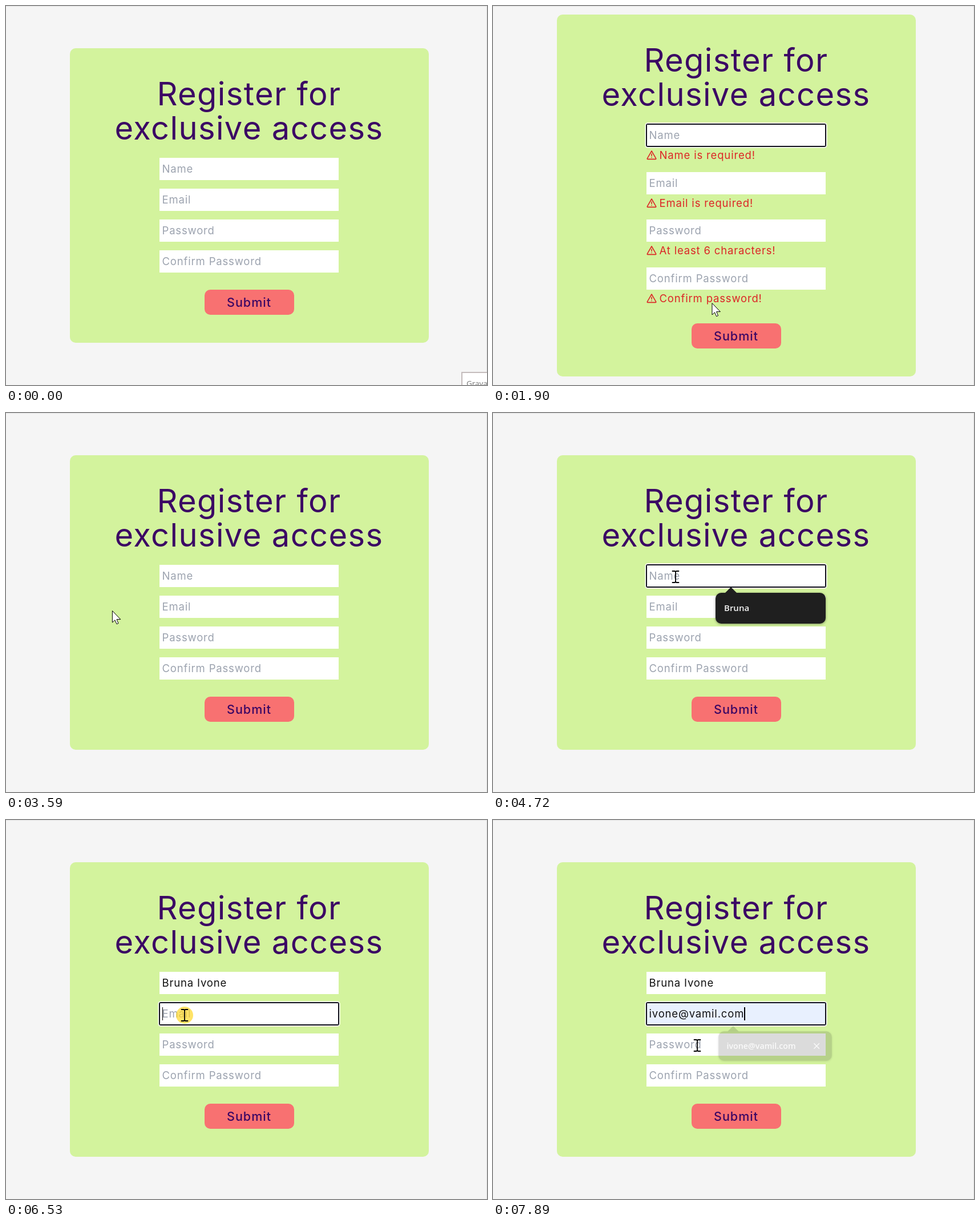
Animation of 843 by 664 pixels, one loop 7.99 s. Source, as an HTML page:

```html
<!DOCTYPE html>
<html lang="en">
<head>
<meta charset="utf-8">
<title>Register form</title>
<style>
html, body { margin: 0; width: 100%; height: 100%; overflow: hidden; background: #f5f5f5; }
body { position: relative; font: 18.5px Inter, sans-serif; font-optical-sizing: none; letter-spacing: .83px; }
body * { position: absolute; box-sizing: border-box; white-space: pre; }
#edge { inset: 0; border: solid #e2e2e2; border-width: 1px 1px 0 0; }
#tip { left: 798px; top: 641px; width: 90px; height: 40px; padding-left: 7px; border: 2px solid #c4bcbc; background: #fff;
  font: 13.5px/36px "Open Sans", sans-serif; letter-spacing: 0; color: #777; }
#card { left: 111.5px; width: 629px; border-radius: 10px; background: #d3f39d; }
h1 { margin: 0; top: 49.5px; width: 100%; text-align: center; font-size: 56px; font-weight: 400; line-height: 60px;
  letter-spacing: 1.4px; color: #3b0764; }
.field { left: 157.5px; width: 314px; height: 39px; }
.box { inset: 0; padding-left: 4.5px; line-height: 39px; background: #fff; color: #111; }
.box.empty { color: #9ca3af; }
.box.focus { border-radius: 2px; box-shadow: inset 0 0 0 1px #10101a, 0 0 0 1px #10101a, 0 0 0 2.5px #fff; }
.box.filled { background: #e8f0fe; }
.box i { position: static; display: inline-block; vertical-align: middle; width: 1.5px; height: 23px;
  margin: -2px -1.5px 0 0; background: #000; }
.error { left: 0; top: 36px; line-height: 36px; padding-left: 22.5px; color: #dc2626; }
.error svg { left: 0; top: 9px; }
#submit { left: 236px; width: 157px; height: 44px; border-radius: 10px; background: #f87171; color: #3b0764;
  text-align: center; font-size: 21.5px; font-weight: 500; line-height: 44px; letter-spacing: 1px; }
#menu { --bg: #1f1f1f; left: 390px; padding-top: 8px; background: var(--bg); color: #f2f2f2;
  font: 600 15px/37.6px "Open Sans", sans-serif; letter-spacing: 0; }
#menu::before { content: ""; position: absolute; left: 17px; top: -20px; border: 10px solid transparent;
  border-bottom-color: var(--bg); }
#menu span { position: static; display: block; padding-left: 15px; }
#menu svg { left: 175px; top: 21px; }
#over { left: 0; top: 0; }
</style>
</head>
<body>
<div id="edge"></div>
<div id="card">
  <h1>Register for
exclusive access</h1>
  <div id="submit">Submit</div>
</div>
<div id="tip">Gravando</div>
<div id="menu"></div>
<svg id="over" width="843" height="664">
  <circle id="halo" r="15" fill="#ffd51f" fill-opacity=".68"/>
  <g id="cursor" stroke-linejoin="round" stroke-linecap="round">
    <path id="arrow" fill="#fff" stroke="#000" d="M0 0V20L4.6 15.8L7.6 22.8L10.6 21.5L7.6 14.6H14Z"/>
    <g id="hand" fill="#fff" stroke="#000" stroke-width="1.2">
      <path d="M-2 1.5Q0-1.5 2 1.5V10Q4 8 5.5 10.5Q8 9 9 11.5Q12 10.5 12.5 13.5V18Q12 21 10 24.5H1L-6.5 15.5Q-6 12.5-3.5 13.5L-2 15Z"/>
      <path d="M2 10V14M5.5 11V14.5M9 12V15"/>
    </g>
    <path id="beam" fill="none" stroke="#000" stroke-width="1.8"
      d="M-5.5-10H-2Q0-10 0-8Q0-10 2-10H5.5M0-8V8M-5.5 10H-2Q0 10 0 8Q0 10 2 10H5.5"/>
  </g>
</svg>
<script>
const LOOP = 7990, STEP = 112.7;
const $ = id => document.getElementById(id);
const show = (el, on) => el.style.display = on ? '' : 'none';
const within = (t, ...spans) => spans.some(([a, b]) => t >= a && t < b);

const NAME = 'Bruna Ivone', EMAIL = 'ivone@vamil.com', OTHER = 'bruna@livia.eco.br';
const EMAILS = [OTHER, EMAIL, 'bruna.ivone@livia.eco.br', 'contato@livia.eco.br',
  'ivone@livia.eco.br', 'bruna@vamil.com', 'cadastro@livia.eco.br'];
const CROSS = '<svg width="12" height="12" stroke="currentColor" stroke-width="1.4"><path d="M1 1L11 11M11 1L1 11"/></svg>';
const WARN = `<svg width="18" height="18" fill="none" stroke="currentColor" stroke-width="1.6" stroke-linejoin="round"
  stroke-linecap="round"><path d="M9 2L16.6 15.2Q17 16.4 15.8 16.4H2.2Q1 16.4 1.4 15.2ZM9 7V10.6M9 13.3V13.4"/></svg>`;

const fields = [
  ['Name', 'Name is required!'],
  ['Email', 'Email is required!'],
  ['Password', 'At least 6 characters!'],
  ['Confirm Password', 'Confirm password!']
].map(([hint, message]) => {
  const root = document.createElement('div');
  root.className = 'field';
  root.innerHTML = `<div class="box"></div><div class="error">${WARN}${message}</div>`;
  $('card').append(root);
  return { hint, root, box: root.children[0], error: root.children[1] };
});

// pointer stops: time, x, y
const path = [
  [110, 790, 652], [330, 640, 612], [560, 490, 560], [900, 420, 531], [1020, 422, 531],
  [1850, 422, 531], [2370, 122, 452],
  [3470, 152, 430], [3700, 210, 290], [3880, 285, 186], [4060, 318, 286], [4170, 320, 287],
  [5510, 320, 287], [5940, 313, 342],
  [6900, 313, 342], [7300, 350, 380], [7640, 412, 408], [7750, 395, 405], [7880, 358, 395]
];

function pointerAt(t) {
  const i = path.findIndex(p => p[0] > t);
  if (i < 1) return path[i ? path.length - 1 : 0].slice(1);
  const [t0, x0, y0] = path[i - 1], [t1, x1, y1] = path[i];
  const k = (t - t0) / (t1 - t0);
  return [x0 + (x1 - x0) * k, y0 + (y1 - y0) * k];
}

function values(t) {
  const typed = t < 4830 ? 0 : 4 * (1 + Math.floor((t - 4830) / 110));
  const email = t < 6860 ? '' : t < 7770 ? EMAIL.slice(0, t < 7080 ? 1 : t < 7200 ? 2 : 3) : EMAIL;
  return [NAME.slice(0, typed), email, '', ''];
}

function drawForm(t) {
  const failed = within(t, [1350, 3260]);
  const top = failed ? 15 : 74, height = failed ? 634 : 516;
  const first = failed ? 207 : 266, gap = failed ? 83.6 : 54;
  $('card').style.top = top + 'px';
  $('card').style.height = height + 'px';
  $('submit').style.top = height - 93 + 'px';

  const focus = within(t, [1350, 3260], [4170, 6530]) ? 0 : t >= 6530 ? 1 : -1;
  const caret = within(t, [1350, 1900], [2410, 2930], [4170, 4720], [4830, 5400], [5960, LOOP]);
  const text = values(t);
  fields.forEach((f, i) => {
    const bar = focus === i && caret ? '<i></i>' : '';
    f.root.style.top = first - top + i * gap + 'px';
    f.box.innerHTML = text[i] ? text[i] + bar : bar + f.hint;
    f.box.classList.toggle('empty', !text[i]);
    f.box.classList.toggle('focus', focus === i);
    f.box.classList.toggle('filled', i === 1 && t >= 7770);
    show(f.error, failed);
  });
  return (x, y) => x > 269 && x < (t > 6530 ? 390 : 583) && y > first && y < first + 3 * gap + 39 && (y - first) % gap < 39;
}

function drawMenu(t) {
  const menu = $('menu'), s = menu.style;
  const fading = t >= 7890;
  const state = within(t, [4720, 4940]) ? [315, 193, 54, ['Bruna'], '10px']
    : within(t, [6630, 6860]) ? [369, 297, 279, EMAILS, '10px']
    : within(t, [6860, 6970]) ? [369, 212, 61, [OTHER], '10px 0 0 0']
    : t >= 6970 ? [369, 209, 54, [EMAIL], '10px'] : null;
  show(menu, state);
  if (!state) return;
  const [top, w, h, items, radius] = state;
  s.top = top + 'px';
  s.width = w + 'px';
  s.height = h + 'px';
  s.borderRadius = radius;
  s.boxShadow = `0 1px 4px rgba(0,0,0,${fading ? .12 : .4})`;
  s.transform = fading ? 'scale(.95)' : '';
  s.setProperty('--bg', fading ? 'rgba(31,31,31,.16)' : '#1f1f1f');
  s.color = fading ? 'rgba(255,255,255,.85)' : '#f2f2f2';
  menu.innerHTML = items.map(e => `<span>${e}</span>`).join('') + (items[0] === EMAIL ? CROSS : '');
}

function drawPointer(t, overField) {
  const [x, y] = pointerAt(Math.floor(t / STEP + .25) * STEP);
  const kind = within(t, [1020, 1900]) ? 'hand' : overField(x, y) ? 'beam' : 'arrow';
  const at = `translate(${x} ${y})`;
  show($('cursor'), within(t, [110, 2480], [3470, LOOP]));
  $('cursor').setAttribute('transform', at);
  for (const id of ['arrow', 'hand', 'beam']) show($(id), id === kind);
  show($('halo'), within(t, [1240, 1350], [4170, 4290], [6530, 6630]));
  $('halo').setAttribute('transform', at);
}

function draw(now) {
  const t = now % LOOP;
  show($('tip'), t < 110);
  const overField = drawForm(t);
  drawMenu(t);
  drawPointer(t, overField);
}

let start;
function tick(now) {
  start ??= now;
  draw(now - start);
  requestAnimationFrame(tick);
}
draw(0);
requestAnimationFrame(tick);
</script>
</body>
</html>
```
